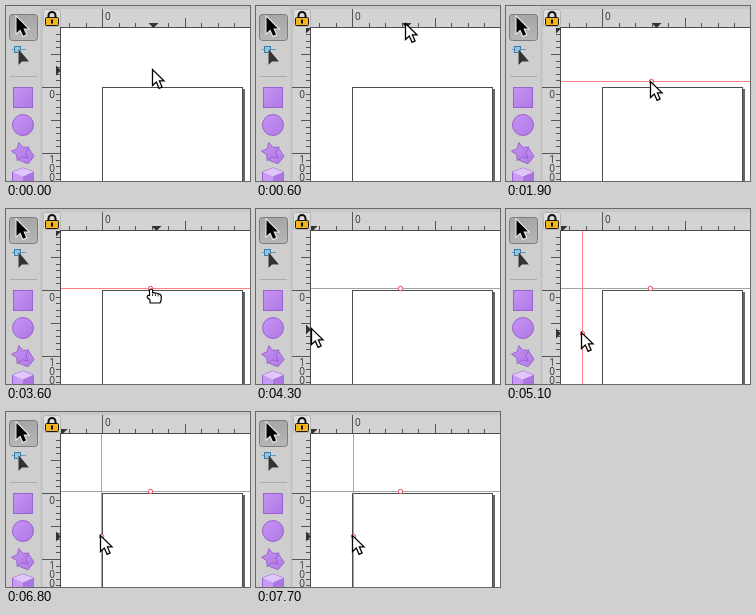
Recreate the animation shown at these times as an HTML page. Size 244x175 px, loop 8 s.

```html
<!DOCTYPE html>
<html lang="en">
<head>
<meta charset="utf-8">
<title>Dragging guides from the rulers</title>
<style>
  html, body { margin: 0; width: 100%; height: 100%; overflow: hidden; background: #fff; }
  svg { display: block; width: 244px; height: 175px; }
  text { font: 10px "Open Sans", "Noto Sans", sans-serif; fill: #333; }
  .crisp { shape-rendering: crispEdges; }
  .purple { fill: url(#violet); stroke: #9a62d0; }
</style>
</head>
<body>
<svg viewBox="0 0 244 175" xmlns="http://www.w3.org/2000/svg">
  <defs>
    <linearGradient id="violet" x1="0" y1="0" x2="1" y2="1">
      <stop offset="0" stop-color="#c794f4"/><stop offset="1" stop-color="#ae78e4"/>
    </linearGradient>
    <linearGradient id="pressed" x1="0" y1="0" x2="0" y2="1">
      <stop offset="0" stop-color="#a6a6a6"/><stop offset="1" stop-color="#b6b6b6"/>
    </linearGradient>
    <path id="pointer" d="M0 0V16L3.8 12.6L6.6 18.8L9.6 17.4L6.9 11.4H11.5Z"/>
    <clipPath id="canvasArea"><rect x="55" y="22" width="189" height="153"/></clipPath>
    <clipPath id="topRuler"><rect x="55" width="189" height="22"/></clipPath>
    <clipPath id="leftRuler"><rect x="37" y="22" width="18" height="153"/></clipPath>
  </defs>

  <rect width="244" height="175" fill="#d3d3d3"/>
  <rect width="34" height="175" fill="#cecece"/>
  <rect x="34" width="3" height="175" fill="#c6c6c6"/>
  <rect x="37" width="207" height="3" fill="#c8c8c8"/>

  <g id="tools">
    <rect x="3.5" y="8.5" width="28" height="26" rx="3" fill="url(#pressed)" stroke="#7b7b7b"/>
    <use href="#pointer" transform="translate(10.5 11)" fill="#000" stroke="#eee" stroke-width="2" paint-order="stroke"/>
    <path d="M6 43.5H20" stroke="#5c9cc4"/>
    <rect x="8.5" y="40.5" width="6" height="6" fill="#8dc6e8" stroke="#397da8"/>
    <path d="M12.5 43V59L16 55.5H23Z" fill="#333" stroke="#ddd" paint-order="stroke"/>
    <path class="crisp" d="M4 70.5H31" stroke="#ababab"/>
    <rect class="purple" x="7.5" y="81.5" width="19" height="20"/>
    <circle class="purple" cx="17" cy="119" r="10.5"/>
    <path class="purple" id="pentagon"/>
    <path class="purple" id="star"/>
    <path d="M6.5 166L17 162L27.5 166V178H6.5Z" fill="#c79bf3" stroke="#9a62d0"/>
    <path d="M6.5 166L17 162L27.5 166L17 170.5Z" fill="#e0c6fb"/>
    <path d="M17 170.5L27.5 166V178H17Z" fill="#ac76e2"/>
  </g>

  <rect x="55" y="22" width="189" height="153" fill="#fff"/>
  <path class="crisp" d="M54.5 175V21.5H244" fill="none" stroke="#4b4b4b"/>
  <path class="crisp" id="ticks" fill="none" stroke="#555"/>
  <text x="99" y="14">0</text>
  <g text-anchor="middle">
    <text x="46" y="92">0</text><text x="46" y="157">1</text>
    <text x="46" y="166">0</text><text x="46" y="175">0</text>
  </g>

  <g id="lock">
    <rect x="37.5" y="3.5" width="17" height="17" rx="2" fill="#dedede" stroke="#b4b4b4"/>
    <path d="M42.5 12V9.5a3.5 3.5 0 0 1 7 0V12" fill="none" stroke="#111" stroke-width="2"/>
    <rect x="39.5" y="11.5" width="13" height="8" rx="1" fill="#f4b51c" stroke="#1c1608"/>
    <path d="M46 13.5V17.5" stroke="#111" stroke-width="2"/>
  </g>

  <g class="crisp">
    <path d="M237 83H239V175H237Z" fill="#666"/>
    <path d="M96.5 175V81.5H236.5V175" fill="none" stroke="#4d4d4d"/>
  </g>

  <g clip-path="url(#topRuler)"><path id="topMark" d="M-5 16.5H5L0 21.5Z" fill="#333"/></g>
  <g clip-path="url(#leftRuler)"><path id="leftMark" d="M49.5 -5V5L54.5 0Z" fill="#333"/></g>

  <g clip-path="url(#canvasArea)" fill="none">
    <g id="hGuide">
      <path class="crisp" d="M-244 0H244"/><circle r="2.2" fill="#fff" stroke="#f04458"/>
    </g>
    <g id="vGuide">
      <path class="crisp" d="M0 -175V175"/><circle r="2.2" fill="#fff" stroke="#f04458"/>
    </g>
  </g>

  <use id="arrow" href="#pointer" fill="#fff" stroke="#000" stroke-width="1.3"/>
  <g id="hand" transform="translate(140 79)" fill="#fff" stroke="#000" stroke-width="1.2" stroke-linejoin="round">
    <path d="M4 15V12L1.3 9.5Q.8 7 3.5 7.5V2Q5 0 6.6 2V5Q8 4 9.4 5.3Q11 4.5 12.2 5.9Q14.6 5.4 15.2 8V12L14 15Z"/>
    <path d="M6.6 6V8M9.4 6V8M12.2 6.5V8.5" stroke-width=".8"/>
  </g>
</svg>

<script>
const $ = id => document.getElementById(id);
const LOOP = 8000, STEP = 100;
const RED = '#ff8080', GREY = '#a0a4a4';
const HOME = { x: 147, y: 63 };
const LEFT_ENTERED = 4400;

// A move that arrives at (x, y) at time `end`; a higher power slows its arrival.
const move = (end, duration, x, y, power = 1) => ({ end, duration, x, y, power });
const nudge = (end, x) => move(end, 300, x, 123);

const moves = [
  move(600, 500, 150, 17),
  move(1800, 900, 145, 73.8, 1.6),
  move(2100, 250, 144, 78),
  move(LEFT_ENTERED, 700, 48, 123, 1.3),
  move(5500, 900, 85, 123, 1.8),
  nudge(5800, 91), nudge(6300, 96), nudge(6800, 95), nudge(7700, 97)
];

function pointerAt(t) {
  return moves.reduce((from, { end, duration, x, y, power }) => {
    const p = Math.min(1, Math.max(0, 1 - (end - t) / duration));
    const eased = 1 - (1 - p) ** power;
    return { x: from.x + (x - from.x) * eased, y: from.y + (y - from.y) * eased };
  }, HOME);
}

function place(id, x, y) {
  $(id).setAttribute('transform', `translate(${Math.round(x) + .5} ${Math.round(y) + .5})`);
}

function show(id, on) {
  $(id).style.display = on ? '' : 'none';
}

function drawGuide(id, at, visible, hot) {
  show(id, visible);
  place(id, at.x, at.y + 1);
  $(id).firstElementChild.setAttribute('stroke', hot ? RED : GREY);
}

// Tenths of a labelled unit, with a longer tick at each half.
function ticks(origin, unit, start, end, draw) {
  let path = '';
  for (let i = Math.ceil((start - origin) * 10 / unit); origin + i * unit / 10 < end; i++) {
    const length = i % 10 === 0 ? 18 : i % 5 === 0 ? 9 : 4;
    path += draw(Math.round(origin + i * unit / 10) + .5, length);
  }
  return path;
}

function polygon(cx, cy, corners, radius, inner, turn) {
  const points = Array.from({ length: corners * 2 }, (_, i) => {
    const r = i % 2 ? inner : radius, a = i * Math.PI / corners + turn;
    return `${(cx + r * Math.cos(a)).toFixed(1)} ${(cy + r * Math.sin(a)).toFixed(1)}`;
  });
  return `M${points.join('L')}Z`;
}

function render(time) {
  const t = Math.floor(time % LOOP / STEP) * STEP;
  const pointer = pointerAt(t);
  const hovering = t >= 3600 && t < 3800;
  show('hand', hovering);
  show('arrow', !hovering);
  place('arrow', pointer.x - 1, pointer.y);

  // The ruler marks stay put while a guide is being dragged.
  const marked = pointerAt(t < 3700 ? Math.min(t, 600) : Math.min(t, LEFT_ENTERED));
  place('topMark', Math.max(marked.x, 56), -.5);
  place('leftMark', -.5, Math.max(marked.y + 1, 22));

  drawGuide('hGuide', pointerAt(Math.min(t - 50, 2400)), t >= 1000, t < 2400 || hovering);
  drawGuide('vGuide', pointer, t >= 4700, true);
}

$('pentagon').setAttribute('d', polygon(20, 150, 5, 8, 6.5, -1.2));
$('star').setAttribute('d', polygon(15, 146, 5, 9.5, 5, -1.8));
$('ticks').setAttribute('d',
  ticks(96, 165, 56, 244, (p, n) => `M${p} 21V${21 - n}`) +
  ticks(81, 66, 23, 175, (p, n) => `M54 ${p}H${54 - n}`));

const start = performance.now();
function frame() {
  render(performance.now() - start);
  requestAnimationFrame(frame);
}
frame();
</script>
</body>
</html>
```
